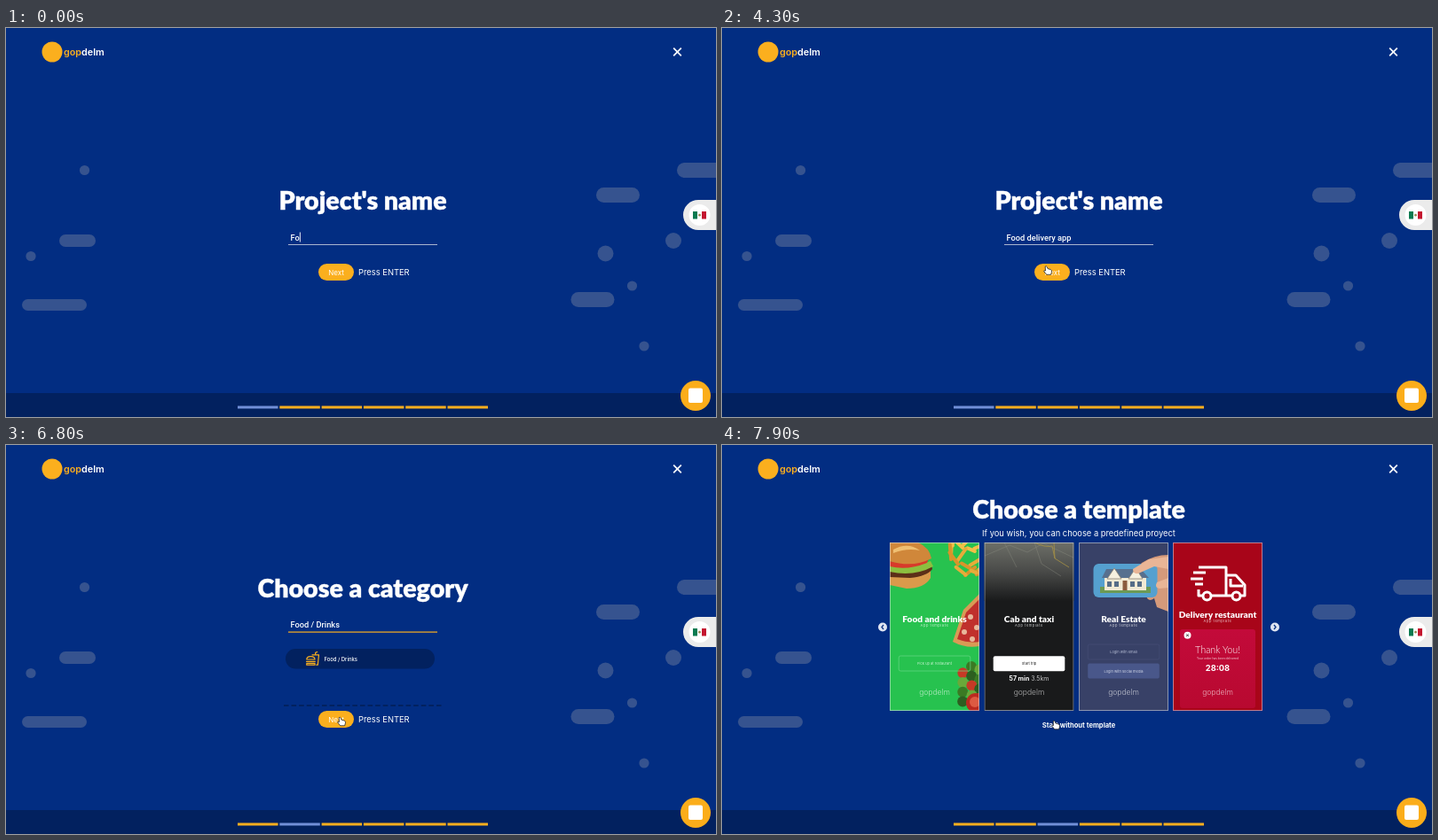
An HTML page for the animation above (8 s loop, 800 by 439 pixels).

```html
<!DOCTYPE html>
<html lang="en">
<head>
<meta charset="utf-8">
<title>Project wizard</title>
<style>
  html, body { margin: 0; width: 100%; height: 100%; overflow: hidden; background: #022d82; }
  svg { display: block; width: 100vw; height: 100vh; }
  text { fill: #fff; font-family: Inter, sans-serif; white-space: pre; }
  .title { font: 900 28.6px Lato, sans-serif; stroke: #fff; stroke-width: .4; }
  .card { font: 900 10.1px Lato, sans-serif; }
  .field { font: 500 9.25px Roboto, sans-serif; }
  .body { font-size: 9.35px; }
  .mid { text-anchor: middle; }
  .tiny { font-size: 4px; }
  .icon { fill: none; stroke: #fbb01f; stroke-width: 1.2; stroke-linejoin: round; stroke-linecap: round; }
</style>
</head>
<body>
<svg id="stage" viewBox="0 0 800 439" preserveAspectRatio="none"></svg>
<script>
const LOOP = 8000, STEP = 100;
const YELLOW = [251, 175, 30], BLUE = [113, 143, 216];
const GOLD = '#fbaf1e', DARK = '#02215f', RULE = '#a9b5cf';

// Drawing helpers
const rect = (x, y, w, h, fill, r = 0, more = '') =>
  `<rect x="${x}" y="${y}" width="${w}" height="${h}" rx="${r}" fill="${fill}" ${more}/>`;
const dot = (x, y, r, fill, more = '') => `<circle cx="${x}" cy="${y}" r="${r}" fill="${fill}" ${more}/>`;
const path = (d, fill, more = '') => `<path d="${d}" fill="${fill}" ${more}/>`;
const line = (d, color, width = 1, more = '') =>
  path(d, 'none', `stroke="${color}" stroke-width="${width}" ${more}`);
const text = (x, y, cls, s, more = '') => `<text x="${x}" y="${y}" class="${cls}" ${more}>${s}</text>`;
const group = (id, body, more = '') => `<g id="${id}" ${more}>${body}</g>`;
const repeat = (n, draw) => [...Array(n).keys()].map(draw).join('');

const nextRow = y =>
  rect(352, y, 40, 19, GOLD, 9.5) +
  text(372, y + 12.6, 'mid', 'Next', 'font-size="8"') +
  text(397, y + 12.9, 'body', 'Press ENTER');

const pill = (y, label, icon) =>
  rect(315, y, 168, 22.5, DARK, 11.2) +
  text(358.5, y + 13.5, '', label, 'font-size="5.9" font-weight="500"') +
  `<path class="icon" transform="translate(338 ${y + 3})" d="${icon}"/>`;

const icons = {
  food: 'M.8 9q0-3.4 4.6-3.4T10 9zM.5 11.3h9.8M.8 13.4h9.2v1.8H.8zM7 3.8h7.5l-1.2 11.4h-1.5M10.7 3.6V1.4l2-.9',
  cart: 'M.5 1.5h2.4l3 7h5.3l2.3-5H3.8M5.9 8.5l-1.4 2.4h8.3M5 14a.8.8 0 1 0 .1 0M11.5 14a.8.8 0 1 0 .1 0',
  bike: 'M3 8.5a2.8 2.8 0 1 0 .1 0M12 8.5a2.8 2.8 0 1 0 .1 0M7.8 13V9.5L5.5 7.5 8.3 5l2 2h2.5M10 2.4a.9.9 0 1 0 .1 0'
};

// Scenery
const backdrop = () => {
  const c = '#36538f';
  const pills = [[60, 233, 41, 14], [18, 306, 73, 13], [756, 152, 60, 17], [665, 180, 49, 17], [636.5, 298, 49, 17]];
  const dots = [[88.5, 160.5, 5.6], [28, 257.5, 5.6], [752, 240, 9], [675.5, 254.5, 9], [705.5, 291, 5.6], [719, 359, 5.6]];
  return rect(0, 0, 800, 439, '#022d82') +
    pills.map(([x, y, w, h]) => rect(x, y, w, h, c, h / 2)).join('') +
    dots.map(([x, y, r]) => dot(x, y, r, c)).join('');
};

const chrome = () =>
  rect(0, 412, 800, 27, DARK) +
  repeat(6, i => rect(261 + i * 47.3, 426.5, 45.5, 3, GOLD, 0, 'class="seg"')) +
  dot(52, 27, 11.5, GOLD) +
  text(65, 30.5, '', `<tspan fill="${GOLD}">gop</tspan><tspan>delm</tspan>`, 'font-size="10.8" font-weight="600"') +
  line('M752.2 22.7l8.6 8.6m0-8.6l-8.6 8.6', '#fff', 1.7) +
  path('M800 194h-20a17 17 0 0 0 0 34h20z', '#ebebeb') + dot(781.5, 211, 12, '#fff') +
  rect(774, 207, 5, 8.5, '#0a7a50') + rect(784, 207, 5, 8.5, '#c4162f') + dot(781.5, 211.2, 1.4, '#9a8a55') +
  dot(777, 415, 17, '#fbad1a') +
  rect(769, 406.5, 16, 16.5, '#fff', 2);

// Pages of the wizard
const projectPage = () =>
  text(402, 205, 'title mid', "Project's name") +
  text(320.5, 239.6, 'field', '', 'id="name"') +
  rect(318, 244, 168, 1, RULE) +
  nextRow(266);

const categoryPage = () =>
  text(402, 172, 'title mid', 'Choose a category') +
  text(320.5, 206, 'field', '', 'id="choice"') +
  rect(318, 210.5, 168, 1.2, RULE, 0, 'id="rule"') +
  group('list', pill(230, 'Food / Drinks', icons.food) +
    group('others', pill(254, 'Shopping', icons.cart) + pill(278, 'Sports', icons.bike)), 'clip-path="url(#window)"') +
  rect(485, 228.3, 6, 9.5, '#f4f4f4', 3, 'id="thumb"') +
  line('M313 294H491', DARK, 2, 'stroke-dasharray="5.5 3.1"') +
  group('go', nextRow(300));

const card = (x, fill, art, name, y = 199.5) => {
  const mid = x + 50.5;
  return `<svg x="${x}" y="110" width="101" height="190" viewBox="${x} 110 101 190">` +
    rect(x, 110, 101, 190, fill) + art(mid) +
    text(mid, y, 'card mid', name) +
    text(mid, y + 5.7, 'mid tiny', 'App template', 'letter-spacing=".55" opacity=".75"') +
    text(mid, 282, 'mid', 'gopdelm', 'font-size="8.5" font-weight="300" opacity=".65"') +
    rect(x + .5, 110.5, 100, 189, 'none', 0, 'stroke="#d5dcec" stroke-opacity=".55"') + '</svg>';
};

const cardButton = (mid, y, fill, label, color, more = '') =>
  rect(mid - 40.3, y, 80.6, 17, fill, 2, more) +
  text(mid, y + 10, 'mid tiny', label, `style="fill:${color}"`);

const fry = i => {
  const a = i * 2.4, x = 274 + 16 * Math.sin(a), y = 130 + 17 * Math.cos(a * 1.7);
  return line(`M${x} ${y}l${11 * Math.cos(a)} ${-9 + 8 * Math.sin(a)}`,
    ['#d9942b', '#f2c047', '#e8ab3a'][i % 3], 4, 'stroke-linecap="round"');
};

const leaf = i => {
  const x = 281 + 11 * Math.sin(i * 2.1), y = 250 + i * 3.6;
  return dot(x, y, 6, ['#3b7a24', '#6aa83a', '#c53a26', '#2d5f20'][i % 4]);
};

const foodArt = mid =>
  path('M189 146q20 6 46-4v8q-7 12-27 12l-19-4z', '#d99a4b') +
  path('M189 139q22 9 47-3l1 4q-6 8-25 10l-23-1z', '#5c2f18') +
  path('M189 133q24 7 46-2l3 6q-22 12-49 6z', '#8cbf3f') +
  path('M189 131q25 6 44-3l-2 5q-22 9-42 4z', '#d83a2b') +
  path('M189 131v-21h32q13 6 15 18-21 11-47 3z', '#d0873a') +
  path('M193 118q16-9 30 1-15-3-30 3z', '#efbf72') +
  repeat(18, fry) +
  path('M290 168l-18 18-12 36q15 8 30 5z', '#d99a55') +
  path('M290 174l-15 15-10 30q13 5 25 3z', '#c0302c') +
  [[280, 194], [273, 211], [287, 206], [282, 219]].map(([x, y]) => dot(x, y, 3, '#e8b79a')).join('') +
  repeat(14, leaf) + dot(286, 291, 11, '#bb2a1f') + dot(285, 290, 6, '#dd5a42') +
  cardButton(mid, 238, 'none', 'Pick up at restaurant', '#c4f2cf', 'stroke="#69d685" stroke-width=".7"');

const cabArt = mid =>
  rect(295, 110, 102, 66, 'url(#mapFade)') +
  line('M296 125l28-12 20 8 18-10 34 16M318 110l14 28M352 110l8 24 22 14', '#8a8c80', .7, 'opacity=".6"') +
  line('M352 110q12 6 20 4l3 14 16 10M374 110l1 18', '#a79145', 1, 'opacity=".8"') +
  cardButton(mid, 238.3, '#fff', 'Start trip', '#222') +
  text(mid, 265.6, 'mid', '<tspan font-weight="700">57 min</tspan> <tspan opacity=".75">3.5km</tspan>', 'font-size="7"');

const houseArt = mid =>
  path('M503 124q-16 0-30 9l-12 12q1 5 8 3l12-7 4 12-7 17q2 8 9 3l3 10 13 5z', '#d59a7b') +
  rect(418.5, 134, 72, 38, '#55a0cf', 6) +
  rect(426, 160, 57, 7, '#6c9a55') +
  rect(431, 149, 47, 15, '#f1ead4') + path('M428 150l5-10h39l9 10z', '#57708f') +
  path('M434 151l8-12 8 12zM458 151l8-12 8 12z', '#f6f0df', 'stroke="#8a7f72" stroke-width=".8"') +
  [434, 442, 460, 468].map(x => rect(x, 154, 5, 6, '#566d87')).join('') + rect(451.5, 153, 5, 11, '#8b5b3d') +
  path('M503 126l-22 3-18 11q0 6 6 5l18-8 16 3zM503 150l-13 5q-3 6 3 7l10-1z', '#e9b596') +
  cardButton(mid, 225, 'none', 'Login with email', '#b5bdd4', 'stroke="#454e76" stroke-width=".7"') +
  cardButton(mid, 246.5, '#49578a', 'Login with social media', '#d0d6e8');

const truckArt = mid =>
  line('M537 138h31v32h-17m-9 0h-5v-7M568 147h11l10 11v12h-5m-9 0h-7M573 151v8h14M531 144h14M528 151h14M533 157h9', '#fff', 3, 'stroke-linejoin="round"') +
  [546.5, 579.5].map(x => dot(x, 170.5, 4.5, 'none', 'stroke="#fff" stroke-width="3"')).join('') +
  rect(516, 208, 85, 89, 'url(#ticket)', 3) + dot(524.5, 214.7, 4, '#fff') +
  line('M523.2 213.4l2.6 2.6m0-2.6l-2.6 2.6', '#222', .9) +
  text(mid, 235.3, 'mid', 'Thank You!', 'style="font:300 10.8px Lato,sans-serif"') +
  text(mid, 242, 'mid', 'Your order has been delivered', 'font-size="3.3" opacity=".8"') +
  text(mid, 254.8, 'mid', '28:08', 'font-size="9.3" font-weight="700"');

const arrow = (x, dir) =>
  dot(x, 205.5, 5, '#dfe5f2') + line(`M${x + dir} 203l${-2 * dir} 2.5 ${2 * dir} 2.5`, '#123a86', 1.4);

const templatePage = () =>
  text(402, 82.5, 'title mid', 'Choose a template') +
  text(402, 102.6, 'body mid', 'If you wish, you can choose a predefined proyect') +
  card(189, '#27c24f', foodArt, 'Food and drinks') +
  card(295.5, '#191a1b', cabArt, 'Cab and taxi') +
  card(402, '#384167', houseArt, 'Real Estate') +
  card(508, '#a80519', truckArt, 'Delivery restaurant', 194.5) +
  arrow(181, 1) + arrow(623, -1) +
  text(402, 318.7, 'mid', 'Start without template', 'font-size="7.6" font-weight="700"');

const pointer = () => group('mouse',
  group('hand', path('M-1.8-4.3q1.3-1 2 .4l.8 2 3.4 1q1.6.8 1 3L4.6 4.8H-.3L-3.3 1q-.2-1.4 1.8-.5z', '#fff', 'stroke="#222" stroke-width=".8"')) +
  group('tip', path('M-2-4.5v8.2l1.9-1.6 1.3 2.7 1.5-.8-1.3-2.5h2.5z', '#111', 'stroke="#fff" stroke-width=".8"')));

const fadeDown = (id, ...stops) => `<linearGradient id="${id}" x2="0" y2="1">` +
  stops.map((c, i) => `<stop offset="${i / (stops.length - 1)}" stop-color="${c}"/>`).join('') + '</linearGradient>';

document.getElementById('stage').innerHTML =
  '<defs><clipPath id="window"><rect x="310" y="228" width="185" height="66"/></clipPath>' +
  fadeDown('mapFade', '#6d6f68', '#494a48', '#191a1b') + fadeDown('ticket', '#c30a3a', '#b80930') + '</defs>' +
  backdrop() +
  group('project', projectPage()) + group('category', categoryPage()) + group('template', templatePage()) +
  rect(0, 0, .9, 11, '#fff', 0, 'id="caret"') +
  dot(0, 0, 18, '#888', 'id="press"') + chrome() + pointer();

// Timeline
const FIRST_SCROLL = { at: 4480, by: 330 }, SECOND_SCROLL = { at: 7193, by: 357 }, SCROLL_MS = 700;
const PICK = 6000;
const NAME = 'Food delivery app';
const keys = [100, 400, 700, 1300, 1400, 1500, 1600, 1700, 1900, 2100, 2300, 2600, 2900, 3100, 3300];
const clicks = [[4400, 4700], [6000, 6300], [7100, 7500]];
const arrowTimes = [[3700, 4000], [4600, 4900], [6400, 6600], [7200, 7800]];
const route = [[3700, 372, 330], [4100, 366, 273], [4500, 366, 274], [5100, 366, 275], [5500, 366, 275], [5900, 373, 244],
  [6200, 373, 244], [6700, 377, 312], [7200, 377, 312], [7400, 377, 315], [7900, 375, 316]];

const $ = id => document.getElementById(id);
const clamp = v => Math.max(0, Math.min(1, v));
const within = (t, spans) => spans.some(([a, b]) => t >= a && t < b);
const show = (id, on) => $(id).setAttribute('visibility', on ? 'inherit' : 'hidden');
const move = (id, x, y) => $(id).setAttribute('transform', `translate(${x} ${y})`);
const ease = p => p < .5 ? 4 * p ** 3 : 1 - 4 * (1 - p) ** 3;
const scrolled = (t, s) => Math.round(s.by * ease(clamp((t - s.at) / SCROLL_MS)));
const fade = (t, at) => clamp((t - at) / 300);
const segs = document.querySelectorAll('.seg');

function mouseAt(t) {
  const i = Math.max(1, route.findIndex(k => k[0] >= t));
  const [t0, x0, y0] = route[i - 1], [t1, x1, y1] = route[i];
  const p = clamp((t - t0) / (t1 - t0)), q = p * p * (3 - 2 * p);
  return [x0 + (x1 - x0) * q, y0 + (y1 - y0) * q];
}

function draw(t) {
  const s1 = scrolled(t, FIRST_SCROLL), s2 = scrolled(t, SECOND_SCROLL);
  const shift = FIRST_SCROLL.by - s1 - s2;
  move('project', 0, -s1);
  move('category', 0, shift);
  move('template', 0, SECOND_SCROLL.by - s2);
  show('project', s1 < FIRST_SCROLL.by);
  show('template', t >= SECOND_SCROLL.at);

  const picked = t >= PICK;
  $('name').textContent = NAME.slice(0, 2 + keys.filter(k => k <= t).length);
  $('choice').textContent = picked ? 'Food / Drinks' : '';
  $('rule').setAttribute('fill', picked ? GOLD : RULE);
  show('others', !picked);
  show('thumb', !picked);
  show('go', picked);

  const typing = t < 3700, searching = t >= 5000 && !picked;
  const blink = typing ? t < 100 || t >= 400 && t < 700 || t >= 1300 && t < 3400 : t < 5500;
  show('caret', blink && (typing || searching));
  const end = typing ? $('name').getComputedTextLength() + 320.6 : 320.6;
  move('caret', end, typing ? 230.5 : 199 + shift);

  const blueness = [1 - fade(t, 4500), fade(t, 4900) - fade(t, 7300), fade(t, 7550)];
  blueness.forEach((b, i) => {
    const mix = YELLOW.map((c, k) => Math.round(c + (BLUE[k] - c) * b));
    segs[i].setAttribute('fill', `rgb(${mix})`);
  });

  const [x, y] = mouseAt(t), tip = within(t, arrowTimes);
  move('mouse', x, y);
  show('mouse', t >= route[0][0]);
  show('hand', !tip);
  show('tip', tip);
  move('press', x - 2, y - 4);
  $('press').setAttribute('opacity', within(t, clicks) ? .48 : 0);
}

const start = performance.now();
function tick() {
  const t = (performance.now() - start) % LOOP;
  draw(Math.floor(t / STEP) * STEP);
  requestAnimationFrame(tick);
}
tick();
</script>
</body>
</html>
```
